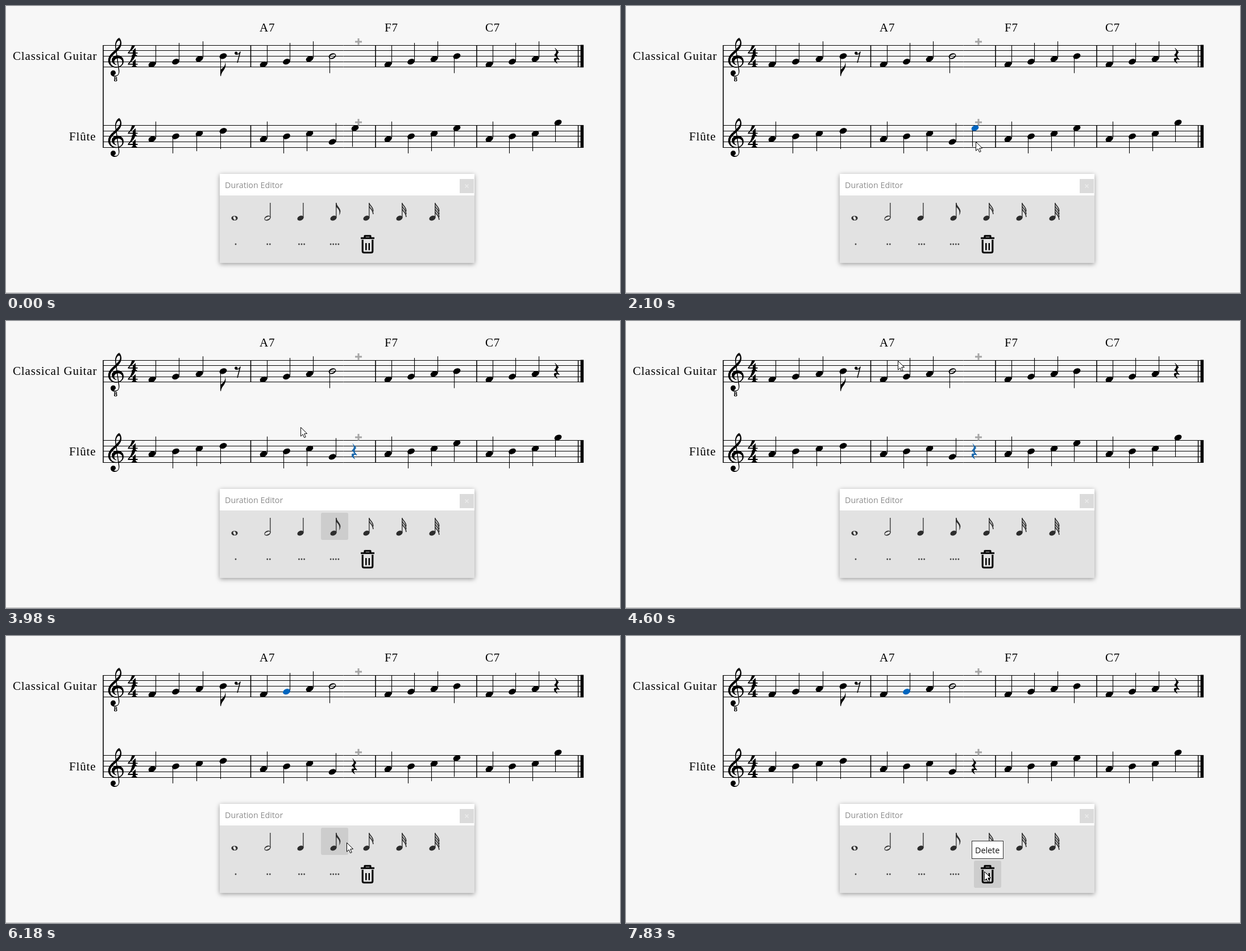
Write an HTML page with a canvas that moves like this. It is 1080 px wide and 506 px high and loops after 8 s.

```html
<!DOCTYPE html>
<html lang="en">
<head>
<meta charset="utf-8">
<title>Duration Editor</title>
<style>
html, body { margin: 0; width: 100%; height: 100%; overflow: hidden; background: #f7f7f7; }
canvas { display: block; width: 1080px; height: 506px; }
</style>
</head>
<body>
<canvas id="stage" width="1080" height="506"></canvas>
<script>
const ctx = document.getElementById('stage').getContext('2d');
const LOOP = 8000;
const SERIF = '"Liberation Serif", serif';
const SANS = '"Open Sans", sans-serif';
const BLUE = '#0065bf';
const STAVES = [88.4, 229.8];
const SPACE = 9.7;

const CLEF_BODY = new Path2D('M6.5-42C9-39 10.5-34.5 10-31C9.5-24 3-18.5-2-14C-6.5-10-9.5-6.5-9.5-1' +
  'C-9.5 5-5 9.3 1 9.3C7 9.3 11.5 6 11.5 1C11.5-3.5 8-5.8 4.5-5.8C0-5.8-2.5-3-2.5 0C-2.5 2.5-1 4.3 1.5 5.5' +
  'L1 6.2C-4 4.8-7 1.5-7-2.5C-7-7.5-2-11 3-11C9.5-11 14-6.5 14-.5C14 6.5 8 10.7 .5 10.7' +
  'C-7.5 10.7-13.3 5-13.3-2C-13.3-11-5-16.5 0-21.5C4-25.5 7.7-29 7.7-33C7.7-35.5 7.2-37 6-37Z');
const CLEF_STEM = new Path2D('M6.5-42L6-37C2.5-37 0-31 .6-26L6.3 15C7.3 22 3.5 26.5-2 26.5C-6 26.5-9 24-9 20.5' +
  'C-9 17-6.5 15.5-4.3 15.5C-1.7 15.5 0 17.5 0 19.7C0 22.5-2 23-3.2 24.3C2 26 6 23 5 16L-.8-25C-2.2-33 2-41 6.5-42Z');
const FOUR = new Path2D('M7 0H12.5C11 6 5 10 2 13H8.5V9.5L13.5 5V13H17V14.8H13.5C13.5 17 14.5 17.8 16 18' +
  'V19.3H6.5V18C8 17.8 8.5 17 8.5 14.8H0V13C4 9 6 5 7 0Z');
const REST = new Path2D('M-2.5-14L3.8-6.5C2-4.5 1-3 1-1.2C1 1.5 3 4 5.3 6.3L4.6 7C1.5 5.4-.8 5.8-.8 8.2' +
  'C-.8 10 .3 11.5 1.7 12.9L1 13.5C-2.5 11.3-5 8.8-4.7 6C-4.4 3.6-2 3 .8 3.9L-4.3-2' +
  'C-1.5-4.2-.8-6-.8-8C-.8-10-1.8-11.8-3.2-13.4Z');
const FLAG_DOWN = new Path2D('M-.5 1V-9C2-13 9-15 8-24C11-16 6-10 3-6Q1-3 .6 1Z');
const FLAG_UP = new Path2D('M-.5 0H.5C1 6 7.6 9 7.6 15Q7.5 19 5 22.5C7 16 5 11-.5 7Z');
const FLAG_THIN = new Path2D('M0 1C1 5 7 7 7 15');
const TRASH = new Path2D('M624 409.2H648M631 408V405.2H641V408' +
  'M627.2 412V432Q627.2 434.8 630 434.8H642Q644.8 434.8 644.8 432V412');
const ARROW = new Path2D('M.5.5V16.2L4.1 12.8 6.6 18.6 9.2 17.5 6.7 11.8 11.6 11.5Z');

// start, end, steps, then [progress, x, y] points
const MOVES = [
  [130, 890, 12, [[0, 848, 446], [.4, 740, 338], [.7, 650, 247], [1, 611, 205]]],
  [960, 960, 1, [[0, 610, 204]]],
  [1220, 1430, 4, [[0, 611, 206], [1, 615, 212]]],
  [2100, 2850, 10, [[0, 615, 239], [.35, 622, 330], [.65, 634, 402], [1, 637, 414]]],
  [3980, 4730, 12, [[0, 518, 187], [.3, 490, 92], [.6, 476, 58], [1, 479, 80]]],
  [4880, 5290, 6, [[0, 480, 82], [1, 494, 95]]],
  [5770, 6530, 12, [[0, 496, 100], [.18, 510, 165], [.455, 545, 298], [.545, 599, 364], [.8, 644, 412], [1, 652, 418]]],
  [6940, 7620, 10, [[0, 650, 418], [1, 631, 416]]],
  [7690, 7830, 3, [[0, 631, 415], [1, 630, 415]]]
];
const CLICKS = [[1700, 1830], [3460, 3580], [5360, 5500]];

function at(x, y, draw) {
  ctx.save();
  ctx.translate(x, y);
  draw();
  ctx.restore();
}

function rect(x, y, w, h, color) {
  ctx.fillStyle = color;
  ctx.fillRect(x, y, w, h);
}

function line(x1, y1, x2, y2, width, color = '#000') {
  ctx.strokeStyle = color;
  ctx.lineWidth = width;
  ctx.beginPath();
  ctx.moveTo(x1, y1);
  ctx.lineTo(x2, y2);
  ctx.stroke();
}

function text(str, x, y, font, color, spacing = 0) {
  ctx.font = font;
  ctx.fillStyle = color;
  ctx.letterSpacing = spacing + 'px';
  ctx.fillText(str, x, y);
}

function fillAt(path, x, y, color = '#000') {
  at(x, y, () => { ctx.fillStyle = color; ctx.fill(path); });
}

function head(x, y, color, hollow, scale = 1) {
  at(x, y, () => {
    ctx.rotate(-.42);
    ctx.scale(scale, scale);
    ctx.fillStyle = color;
    ctx.beginPath();
    ctx.ellipse(0, 0, 6.7, 4.7, 0, 0, 7);
    if (hollow) ctx.ellipse(0, 0, 5.6, 2.5, 0, 0, 7);
    ctx.fill('evenodd');
  });
}

// step counts half spaces above the middle line
function note(x, staff, step, opt = {}) {
  const y = STAVES[staff] - step * SPACE / 2;
  const up = step < 0;
  const len = up ? { '-1': 31, '-2': 33, '-3': 34 }[step] : opt.flag ? 34 : 30 + Math.min(step, 4);
  const sx = Math.floor(up ? x + 6 : x - 5) + .5;
  line(sx, y + (up ? -1 : 1), sx, y + (up ? -len : len), 1.1);
  head(x, y, opt.color || '#000', opt.half);
  if (opt.flag) fillAt(FLAG_DOWN, sx, y + len);
}

function staffBase(mid) {
  for (let i = -2; i <= 2; i++) {
    const y = Math.floor(mid + i * SPACE) + .5;
    line(171, y, 1016, y, 1);
  }
  const top = mid - 2 * SPACE, bottom = mid + 2 * SPACE;
  for (const x of [430.5, 650, 828]) line(x, top, x, bottom, 1.6);
  line(1006.5, top, 1006.5, bottom, 1.5);
  rect(1010.5, top - .5, 5.5, 4 * SPACE + 1, '#000');
  fillAt(CLEF_BODY, 193, mid + SPACE);
  fillAt(CLEF_STEM, 193, mid + SPACE);
  fillAt(FOUR, 214.5, top);
  fillAt(FOUR, 214.5, mid + .3);
}

function eighthRest(x, y) {
  ctx.fillStyle = '#000';
  ctx.beginPath();
  ctx.arc(x - 2.3, y - 5, 2.6, 0, 7);
  ctx.fill();
  ctx.strokeStyle = '#000';
  ctx.lineWidth = 1.5;
  ctx.beginPath();
  ctx.moveTo(x - 3, y - 3);
  ctx.quadraticCurveTo(x + 3, y - 2, x + 5, y - 7);
  ctx.lineTo(x, y + 12);
  ctx.stroke();
}

function score(t) {
  line(171, 69, 171, 250, 1.6);
  STAVES.forEach(staffBase);
  text('8', 189.5, 133, 'bold 13px ' + SERIF, '#000');

  const big = '21px ' + SERIF;
  text('Classical Guitar', 12, 95, big, '#000', .85);
  text('Flûte', 111, 237, big, '#000', .85);
  [['A7', 446], ['F7', 666], ['C7', 843]].forEach(([s, x]) => text(s, x, 45, big, '#000', .85));

  [257, 453, 672, 850].forEach((x, bar) => {
    const gap = bar ? 40.5 : 41.5;
    for (let i = 0; i < 3; i++) {
      const chosen = bar === 1 && i === 1 && t >= 5500;
      note(x + gap * i, 0, i - 3, { color: chosen ? BLUE : '#000' });
      note(x + gap * i, 1, i - 1);
    }
  });
  note(382, 0, 0, { flag: true });
  eighthRest(407, 88);
  note(574, 0, 0, { half: true });
  note(793, 0, 0);
  fillAt(REST, 968.5, 88);

  note(382, 1, 2);
  note(574, 1, -2);
  note(793, 1, 3);
  note(971, 1, 5);
  if (t < 3580) note(614, 1, 3, { color: t >= 1830 ? BLUE : '#000' });
  else fillAt(REST, 612.5, 230, t < 5500 ? '#1c69ad' : '#000');

  for (const y of [63, 205]) {
    rect(614, y - 1.5, 12, 3, '#a6a6a6');
    rect(618.5, y - 6, 3, 11.5, '#a6a6a6');
  }
}

function noteIcon(i) {
  const x = 402 + 58 * i, ink = '#2d2d2d';
  if (i === 0) {
    ctx.fillStyle = ink;
    ctx.beginPath();
    ctx.ellipse(x, 374, 5.6, 4.1, 0, 0, 7);
    ctx.ellipse(x, 374, 2.2, 3.2, -.4, 0, 7);
    ctx.fill('evenodd');
    return;
  }
  head(x, 374, ink, i === 1, .87);
  const sx = x + 4.8;
  line(sx, 373, sx, 347, 1.3, ink);
  if (i === 3) fillAt(FLAG_UP, sx, 347, ink);
  for (let k = 0; i > 3 && k < i - 2; k++) {
    at(sx, 347 + k * 5, () => {
      ctx.lineWidth = 1.6;
      ctx.stroke(FLAG_THIN);
    });
  }
}

function trash() {
  ctx.strokeStyle = '#000';
  ctx.lineWidth = 3.1;
  ctx.lineJoin = 'round';
  ctx.stroke(TRASH);
  line(633.3, 418, 633.3, 430.5, 2.5);
  line(638.8, 418, 638.8, 430.5, 2.5);
}

function panel(hover) {
  ctx.save();
  ctx.shadowColor = 'rgba(0,0,0,.38)';
  ctx.shadowBlur = 8;
  ctx.shadowOffsetY = 2;
  rect(376, 296, 448, 157, '#e2e2e2');
  ctx.restore();
  rect(376, 296, 448, 38, '#fff');
  text('Duration Editor', 385, 321, '14.3px ' + SANS, '#8c8c8c');
  rect(798, 305, 25, 25, '#dbdbdb');
  line(807.5, 314.5, 813.5, 320.5, 1.2, '#ededed');
  line(813.5, 314.5, 807.5, 320.5, 1.2, '#ededed');

  if (hover >= 0) {
    ctx.fillStyle = '#cdcdcd';
    ctx.beginPath();
    ctx.roundRect(380 + 58 * (hover % 7), 338 + 58 * Math.floor(hover / 7), 48, 48, 3);
    ctx.fill();
  }
  for (let i = 0; i < 7; i++) noteIcon(i);
  for (let n = 1; n <= 4; n++) {
    for (let k = 0; k < n; k++) {
      ctx.fillStyle = '#444';
      ctx.beginPath();
      ctx.arc(346 + 58 * n + (k - (n - 1) / 2) * 4.6, 420, 1.4, 0, 7);
      ctx.fill();
    }
  }
  trash();
}

function along(points, u) {
  let i = 0;
  while (i < points.length - 2 && u > points[i + 1][0]) i++;
  const a = points[i], b = points[i + 1] || a;
  const f = b === a ? 0 : (u - a[0]) / (b[0] - a[0]);
  return [a[1] + (b[1] - a[1]) * f, a[2] + (b[2] - a[2]) * f].map(Math.round);
}

// the pointer moves in even steps and rests between them
function pointer(t) {
  const move = MOVES.filter(m => t >= m[0]).pop();
  if (!move) return null;
  const [start, end, steps, points] = move;
  if (t >= end) return along(points, 1);
  const k = Math.floor((t - start) / (end - start) * (steps - 1) + .15);
  return along(points, k / (steps - 1));
}

function hovered(t, pos) {
  if (t >= 3980 && t < 4060) return 3;
  if (!pos) return -1;
  const col = Math.floor((pos[0] - 380) / 58), row = Math.floor((pos[1] - 338) / 58);
  const inside = (pos[0] - 380) % 58 <= 48 && (pos[1] - 338) % 58 <= 48;
  const valid = row === 0 ? col >= 0 && col < 7 : row === 1 && col >= 0 && col < 5;
  return inside && valid ? row * 7 + col : -1;
}

function spot(x, y) {
  ctx.save();
  ctx.beginPath();
  ctx.arc(x, y, 14.8, 0, 7);
  ctx.globalCompositeOperation = 'multiply';
  ctx.fillStyle = '#fdfb78';
  ctx.fill();
  ctx.globalCompositeOperation = 'source-over';
  ctx.fillStyle = 'rgba(250,246,40,.25)';
  ctx.fill();
  ctx.restore();
}

function tooltip() {
  rect(608, 361, 56, 32, '#333');
  rect(609, 362, 54, 30, '#fff');
  text('Delete', 614, 383, '14.3px ' + SANS, '#111');
}

function render(t) {
  rect(0, 0, 1080, 506, '#f7f7f7');
  rect(0, 505, 1080, 1, '#bdbdbd');
  const pos = pointer(t);
  score(t);
  panel(hovered(t, pos));
  if (t >= 6870) tooltip();
  if (!pos) return;
  if (CLICKS.some(([a, b]) => t >= a && t < b)) spot(...pos);
  at(pos[0], pos[1], () => {
    ctx.fillStyle = '#fff';
    ctx.fill(ARROW);
    ctx.strokeStyle = '#000';
    ctx.lineWidth = 1;
    ctx.lineJoin = 'miter';
    ctx.stroke(ARROW);
  });
}

const begin = performance.now();
function tick() {
  render((performance.now() - begin) % LOOP);
  requestAnimationFrame(tick);
}
tick();
</script>
</body>
</html>
```
